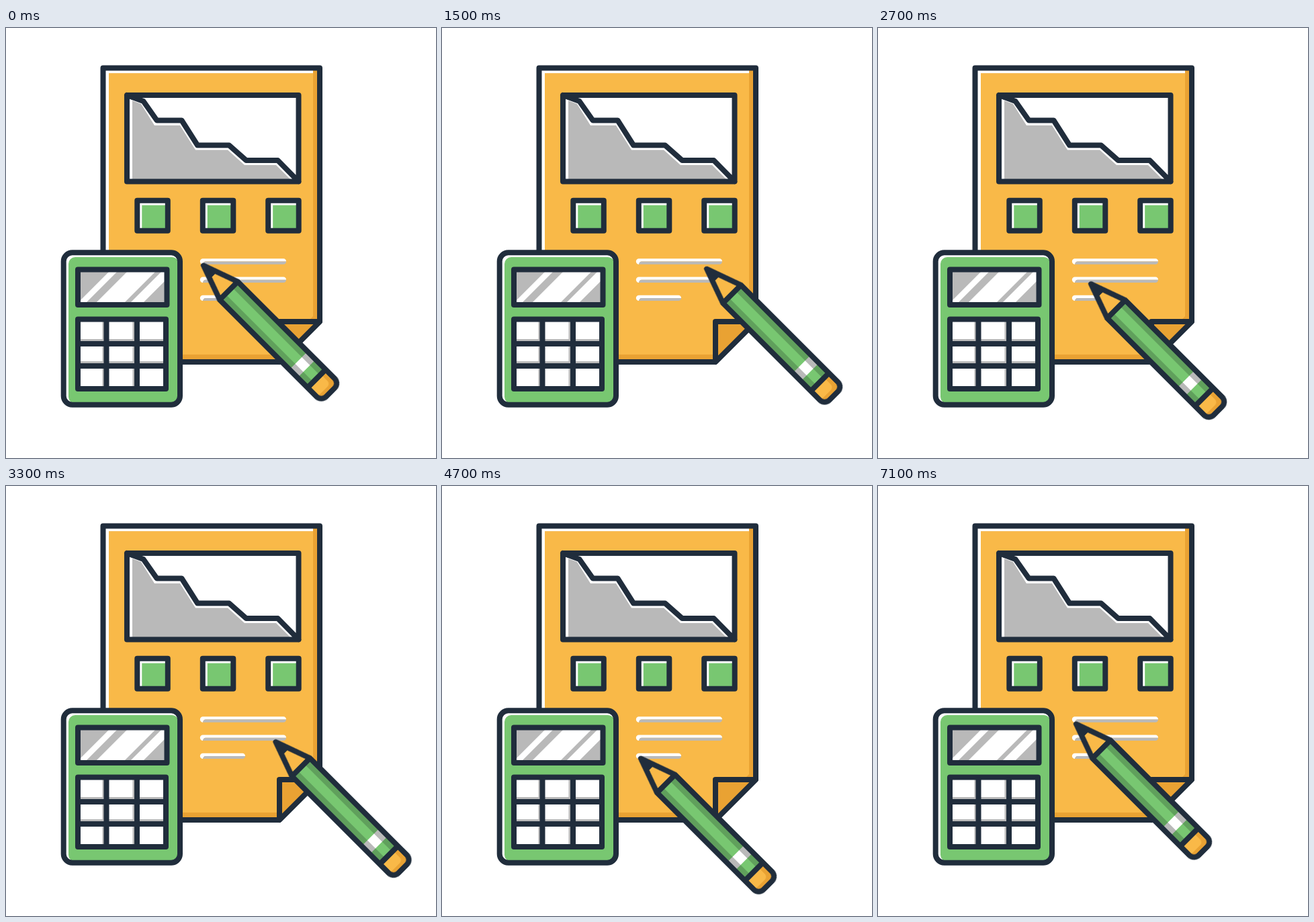
These frames come from a looping animation (640x640 px, 7200 ms). An HTML page without scripts:

```html
<!DOCTYPE html>
<html lang="en">
<head>
<meta charset="utf-8">
<title>Report, calculator and pencil</title>
<style>
  html, body { margin: 0; width: 100%; height: 100%; overflow: hidden; background: #fff; }
  svg { display: block; width: 100vw; height: 100vh; }
  .line { fill: none; stroke: #202d3c; stroke-width: 8; stroke-linejoin: round; stroke-linecap: round; }
  .ink { fill: #202d3c; }
  .white { fill: #fff; }
  .gray { fill: #b9b9b9; }
  .orange { fill: #f9b948; }
  .amber { fill: #e9a233; }
  .green { fill: #78c771; }
  .moss { fill: #60a05c; }

  /* Three strokes of writing, each followed by a return to the next line */
  .pencil { animation: write 7200ms cubic-bezier(.29, 0, .63, 1) infinite; }
  @keyframes write {
    0%, 100% { transform: translate(0, 0); }
    16.6667% { transform: translate(123px, 0); }
    33.3333% { transform: translate(0, 27.5px); }
    50% { transform: translate(124px, 27.5px); }
    66.6667% { transform: translate(0, 52.5px); }
    83.3333% { transform: translate(63px, 52.5px); }
  }
</style>
</head>
<body>
<svg viewBox="0 0 640 640">
  <defs>
    <g id="box">
      <path class="white" d="M0 0H45.5V45H0z"/>
      <path class="green" d="M7 7H45V45H7z"/>
      <path class="line" d="M0 0H45.5V45H0z"/>
    </g>
    <g id="rule">
      <path class="white" d="M293 343.3H413a4 4 0 0 1 4 4.2H297q-3 0-4 4.2a4.2 4.2 0 0 1 0-8.4z"/>
      <path class="gray" d="M293 351.7q1-4.2 4-4.2H417a4 4 0 0 1-4 4.2z"/>
    </g>
  </defs>

  <g id="report">
    <path class="white" d="M144.5 59.5H467V437L407 497H144.5z"/>
    <path class="amber" d="M153 67.5H457V63H467V437L407 497H153z"/>
    <path class="orange" d="M153 67.5H457V429l-5 5H403V486H153z"/>
    <path class="line" d="M144.5 59.5H467V437L407 497H144.5z"/>
    <path class="amber" d="M407 437H467L407 497z"/>
    <path class="line" d="M407 437H467L407 497z"/>

    <path class="white" d="M180 100H435.5V228.5H180z"/>
    <path class="gray" d="M188 108L201 113 221 145H259L282 181.5H330L355 204H402L424 226H188z"/>
    <path class="line" d="M180 100H435.5V228.5H180zL204.5 109 224.500 137.500H261.500L285 174.500H332L357.500 197H404.500L435.500 228.500"/>

    <use href="#box" x="195.300" y="256.800"/>
    <use href="#box" x="292.800" y="256.800"/>
    <use href="#box" x="390.200" y="256.800"/>

    <use href="#rule"/>
    <use href="#rule" y="27.200"/>
    <g transform="translate(0 54.400)">
      <path class="white" d="M293 343.3H352a4 4 0 0 1 4 4.2H297q-3 0-4 4.200a4.2 4.2 0 0 1 0-8.400z"/>
      <path class="gray" d="M293 351.7q1-4.2 4-4.2H356a4 4 0 0 1-4 4.200z"/>
    </g>
  </g>

  <g id="calculator">
    <rect class="white" x="85.700" y="334.300" width="173.300" height="226.400" rx="13"/>
    <rect class="green" x="93" y="341" width="164" height="218" rx="10"/>
    <rect class="line" x="85.700" y="334.300" width="173.300" height="226.400" rx="13"/>

    <path class="white" d="M107 359.500H239.500V412H107z"/>
    <path class="gray" d="M109 362H154L109 407zM166 362H181L135 408H120zM223 362H232L186 408H177zM238 375V410H203z"/>
    <path class="line" d="M107 359.500H239.500V412H107z"/>

    <path class="white" d="M107 433.500H238V537H107z"/>
    <path class="gray" d="M143.500 434h4V537h-4zM188.500 434h4V537h-4zM107 463H238v4H107zM107 496H238v4H107z"/>
    <path class="line" d="M107 433.500H238V537H107zM149.500 433.500V537M195 433.500V537M107 470H238M107 503H238"/>
  </g>

  <g class="pencil">
    <!-- Drawn along the x axis with its tip at the origin -->
    <g transform="translate(294 353.500) rotate(45)">
      <path class="orange" d="M0 0L53-19V19z"/>
      <path class="ink" d="M0 0L21-8V8z"/>
      <path class="moss" d="M53-19H238V19H53z"/>
      <path class="green" d="M53-7H238V7H53z"/>
      <path class="gray" d="M200-19H217V19H200z"/>
      <path class="white" d="M200-7H217V7H200z"/>
      <path class="amber" d="M238-19H257a10 10 0 0 1 10 10V9a10 10 0 0 1-10 10H238z"/>
      <path class="orange" d="M238-9H252a6 6 0 0 1 6 6V13a6 6 0 0 1-6 6H238z"/>
      <path class="line" d="M0 0L53-19H257a10 10 0 0 1 10 10V9a10 10 0 0 1-10 10H53zM53-19V19M238-19V19"/>
    </g>
  </g>
</svg>
</body>
</html>
```
